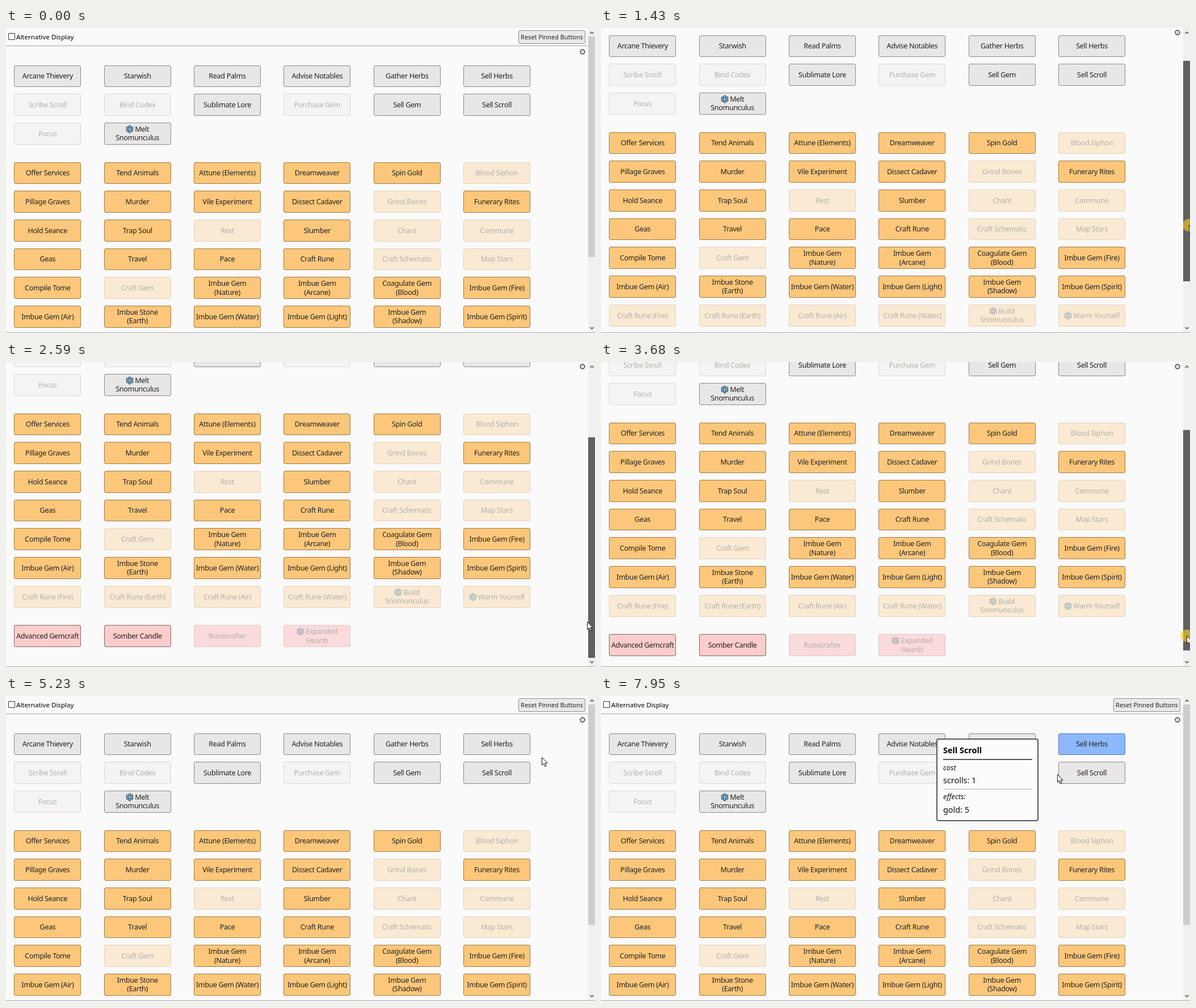
These frames come from a looping animation (1038x540 px, 8000 ms). An HTML page:

```html
<!DOCTYPE html>
<html lang="en">
<head>
<meta charset="utf-8">
<title>Button panel</title>
<style>
html, body { margin: 0; width: 100%; height: 100%; overflow: hidden; background: #fafafa; }
body { position: relative; font-family: "Noto Sans", sans-serif; color: #222; }
body *, .btn { box-sizing: border-box; }
#stage { position: absolute; left: 0; top: 0; width: 1038px; height: 540px; overflow: hidden; background: #fafafa; }
#view { position: absolute; left: 0; top: 0; width: 1026px; height: 537px; overflow: hidden; }
#page { position: absolute; left: 0; top: 0; width: 1026px; height: 683px; }
.rule { position: absolute; left: 0; height: 1px; background: #a3a3a3; }
.box { position: absolute; left: 4px; top: 9px; width: 12px; height: 12px; border: 1px solid #333; border-radius: 1px; background: #fff; }
.alt { position: absolute; left: 18px; top: 8px; font-size: 11.55px; line-height: 16px; white-space: nowrap; color: #000; }
.reset { position: absolute; left: 903px; top: 4px; width: 118px; height: 24px; border: 1px solid #8f8f94; border-radius: 3px;
  background: #e9e9ea; font-size: 10.9px; line-height: 22px; text-align: center; white-space: nowrap; }
.btn { position: absolute; width: 118px; height: 38.75px; border: 1px solid; border-radius: 3px; display: flex; align-items: center;
  justify-content: center; text-align: center; white-space: nowrap; font-size: 12.6px; line-height: 15.3px; letter-spacing: -.35px; }
.gray { background: #e8e6e6; border-color: #8b8b8b; }
.gold { background: #fcc77b; border-color: #a07a42; }
.pink { background: #fdcccc; border-color: #7c6a6a; }
.off { color: #b3b0ac; }
.gray.off { background: #f4f4f4; border-color: #d9d9d9; }
.gold.off { background: #faead3; border-color: #e2d3bd; }
.pink.off { background: #fadada; border-color: #e3c8c8; }
.btn.lit { background: #8cb8ff; border-color: #5b79ab; }
.flake { width: 14px; height: 15px; vertical-align: -3px; margin-right: 2px; }
.off .flake { opacity: .35; }
#gear { position: absolute; left: 1010px; top: 0; width: 12px; height: 12px; }
#bar { position: absolute; left: 1026px; top: 0; width: 12px; height: 537px; background: #f0f0f0; }
#thumb { position: absolute; left: 0; top: 15px; width: 12px; height: 389px; }
#bar svg { position: absolute; left: 0; top: 0; }
.tip { position: absolute; left: 591px; width: 180px; height: 146px; border: 2px solid #585858; border-radius: 4px; background: #fcfcfc;
  font-size: 14.4px; line-height: 20px; white-space: nowrap; color: #111; }
.tip > * { position: absolute; left: 10px; margin: 0; }
.tip b { top: 9px; color: #000; }
.tip i { font-size: 12.8px; }
.tip hr { width: 157px; border: 0; background: #555; }
#spot { position: absolute; left: -11px; top: -11px; width: 22px; height: 22px; border-radius: 50%; background: rgba(255,212,30,.6); }
#arrow { position: absolute; left: 0; top: 0; width: 12px; height: 18px; overflow: visible; }
</style>
</head>
<body>
<div id="stage">
  <div id="view">
    <div id="page">
      <span class="box"></span><span class="alt">Alternative Display</span>
      <div class="reset">Reset Pinned Buttons</div>
      <div class="rule" style="top:31px;width:1025px"></div>
    </div>
    <svg id="gear" viewBox="-6 -6 12 12" fill="none" stroke="#333">
      <circle r="3.6" stroke-width="1.1"/><circle r="4.6" stroke-width="1.1" stroke-dasharray="1.2 2.41"/><circle r=".8" fill="#333" stroke="none"/>
    </svg>
  </div>
  <div id="bar">
    <div id="thumb"></div>
    <svg width="12" height="537" fill="none" stroke="#505050" stroke-width="1.5"><path d="M3.5 10L6.5 7L9.5 10M3.5 528L6.5 531L9.5 528"/></svg>
  </div>
  <div class="rule" style="top:537px;width:1038px"></div>
  <div id="tips"></div>
  <div id="pointer" style="position:absolute;left:0;top:0">
    <div id="spot"></div>
    <svg id="arrow"><path d="M.5.5V14L3.6 11.2L5.8 16.4L8 15.4L5.8 10.4H10Z" fill="#fff" stroke="#111" stroke-width="1"/></svg>
  </div>
</div>
<script>
const $ = id => document.getElementById(id);

// "-" marks a disabled button, "*" a snowflake, "|" a line break
const groups = [
  ["gray", 65.7, `Arcane Thievery,Starwish,Read Palms,Advise Notables,Gather Herbs,Sell Herbs,
-Scribe Scroll,-Bind Codex,Sublimate Lore,-Purchase Gem,Sell Gem,Sell Scroll,-Focus,*Melt|Snomunculus`],
  ["gold", 236.6, `Offer Services,Tend Animals,Attune (Elements),Dreamweaver,Spin Gold,-Blood Siphon,
Pillage Graves,Murder,Vile Experiment,Dissect Cadaver,-Grind Bones,Funerary Rites,
Hold Seance,Trap Soul,-Rest,Slumber,-Chant,-Commune,Geas,Travel,Pace,Craft Rune,-Craft Schematic,-Map Stars,
Compile Tome,-Craft Gem,Imbue Gem|(Nature),Imbue Gem|(Arcane),Coagulate Gem|(Blood),Imbue Gem (Fire),
Imbue Gem (Air),Imbue Stone|(Earth),Imbue Gem (Water),Imbue Gem (Light),Imbue Gem|(Shadow),Imbue Gem (Spirit),
-Craft Rune (Fire),-Craft Rune (Earth),-Craft Rune (Air),-Craft Rune (Water),-*Build|Snomunculus,-*Warm Yourself`],
  ["pink", 610.3, "Advanced Gemcraft,Somber Candle,-Runecrafter,-*Expanded|Hearth"]
];

const petals = [0, 60, 120, 180, 240, 300];
const flake = `<svg class="flake" viewBox="-7 -7 14 14">` +
  petals.map(a => `<circle cy="-4.2" r="2.6" fill="#29414f" transform="rotate(${a})"/>`).join("") +
  `<circle r="4.6" fill="#29414f"/>` +
  petals.map(a => `<path d="M0 0V-5.6M-1.5-5L0-3.5L1.5-5" fill="none" stroke="#8fcdec" stroke-width="1.3" transform="rotate(${a})"/>`).join("") +
  `</svg>`;

const buttons = {};
for (const [kind, top, list] of groups) {
  list.split(",").forEach((item, i) => {
    const raw = item.trim(), off = raw[0] === "-", text = raw.replace("-", "");
    const el = document.createElement("div");
    el.className = `btn ${kind}${off ? " off" : ""}`;
    el.style.left = 14.3 + (i % 6) * 158.35 + "px";
    el.style.top = top + Math.floor(i / 6) * 50.7 + "px";
    el.innerHTML = `<span>${text.replace("*", flake).replace("|", "<br>")}</span>`;
    $("page").append(el);
    buttons[text] = el;
  });
}

function addTip(top, title, cost, gain) {
  const el = document.createElement("div");
  el.className = "tip";
  el.style.top = top + "px";
  el.innerHTML = `<b>${title}</b><hr style="top:34px;height:2px"><i style="top:39px">cost</i><span style="top:62px">${cost}</span>
    <hr style="top:87px;height:1px;background:#aaa"><i style="top:90px">effects:</i><span style="top:114px">${gain}</span>`;
  $("tips").append(el);
  return el;
}
const herbTip = addTip(24, "Sell Herbs", "herbs: 1", "gold: 1");
const scrollTip = addTip(75, "Sell Scroll", "scrolls: 1", "gold: 5");

const scrollKeys = [[1140, 0], [1430, 53], [1730, 132], [1850, 146], [3630, 146], [3920, 54], [4150, 9], [4310, 0]];
const moveKeys = [
  [110, 988, 450], [580, 1025, 297], [650, 1025, 297], [730, 1031, 303], [1040, 1036, 304], [1140, 1036, 305],
  [1430, 1036, 348], [1730, 1025, 407], [1960, 1024, 445], [2050, 1024, 446], [2130, 1024, 458], [2590, 1024, 458],
  [2980, 868, 400], [3380, 1029, 492], [3450, 1031, 498], [3630, 1031, 498], [3920, 1039, 413], [4310, 1054, 365],
  [4859, 1054, 365], [4860, 1019, 211], [5230, 944, 108], [5620, 849, 83], [5710, 848, 83], [6050, 848, 83],
  [6250, 790, 102], [6560, 782, 187], [7800, 782, 187], [7950, 804, 138]
];
const thumbKeys = [[0, "#cdcdcd"], [730, "#a6a6a6"], [980, "#606060"], [2660, "#cdcdcd"], [3300, "#a6a6a6"], [3640, "#606060"], [4460, "#cdcdcd"]];

function at(keys, t, n = 1) {
  if (t <= keys[0][0]) return keys[0][n];
  const i = keys.findIndex(k => k[0] > t);
  if (i < 0) return keys[keys.length - 1][n];
  const a = keys[i - 1], b = keys[i];
  return a[n] + (b[n] - a[n]) * (t - a[0]) / (b[0] - a[0]);
}
const within = (t, a, b) => t >= a && t < b;
const show = (el, on) => { el.style.visibility = on ? "visible" : "hidden"; };

function draw(t) {
  const y = at(scrollKeys, t);
  $("page").style.top = -Math.round(y) + "px";
  $("gear").style.top = Math.max(36 - Math.round(y), 2) + "px";
  $("thumb").style.top = 15 + Math.round(y * .811) + "px";
  $("thumb").style.background = thumbKeys.filter(k => k[0] <= t).pop()[1];
  $("pointer").style.transform = `translate(${Math.round(at(moveKeys, t))}px,${Math.round(at(moveKeys, t, 2))}px)`;
  show($("arrow"), t >= 110);
  show($("spot"), within(t, 980, 2050) || within(t, 3640, 4400) || within(t, 5860, 6050));
  show(herbTip, within(t, 5320, 6200));
  show(scrollTip, t >= 7870);
  buttons["Sell Herbs"].classList.toggle("lit", t >= 5940);
}

const start = performance.now();
function tick() {
  draw((performance.now() - start) % 8000);
  requestAnimationFrame(tick);
}
tick();
</script>
</body>
</html>
```
